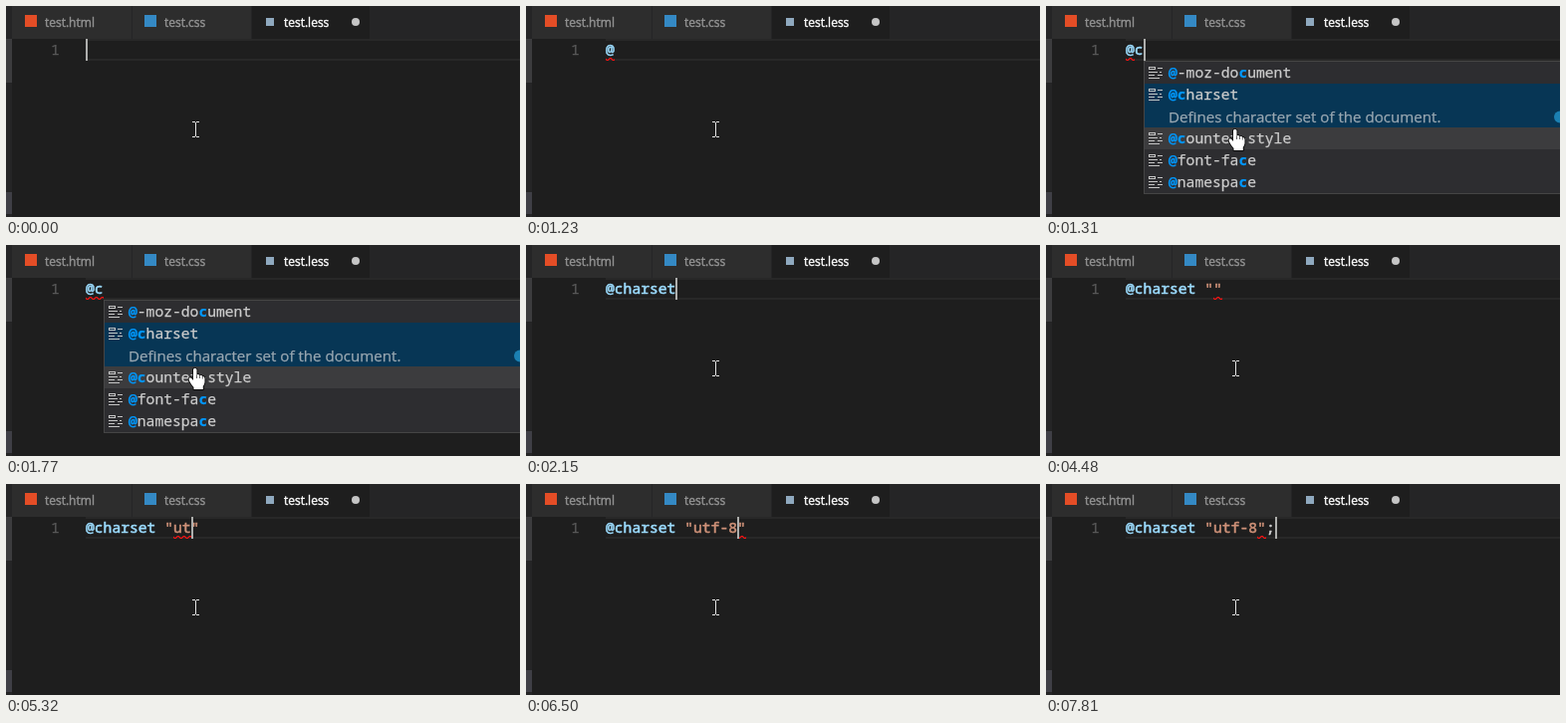
Recreate the animation shown at these times as an HTML page with a canvas. Size 516 by 212 pixels, loop 8 s.

```html
<!DOCTYPE html>
<html lang="en">
<head>
<meta charset="utf-8">
<title>Editor autocomplete</title>
<style>
html, body { margin: 0; width: 516px; height: 212px; overflow: hidden; background: #1e1e1e; }
canvas { display: block; }
</style>
</head>
<body>
<canvas id="stage" width="516" height="212"></canvas>
<script>
const ctx = document.getElementById('stage').getContext('2d');
const LOOP = 8000, CHAR = 8.8, LEFT = 80;
const MONO = '14.667px "Noto Sans Mono", monospace';
const SANS = '"Open Sans", sans-serif';
const OFF = -1;

// start time, typed text, caret column, squiggle start and end columns
const STEPS = [
  [0, '', 0],
  [370, '', OFF],
  [770, '@', 1],
  [1000, '@', 1, 0, 1],
  [1230, '@', OFF, 0, 1],
  [1310, '@c', 2, 0, 1],
  [1460, '@c', 2, 0, 2],
  [1770, '@c', OFF, 0, 2],
  [2150, '@charset', 8],
  [2380, '@charset', 8, 0, 8],
  [2700, '@charset', OFF, 0, 8],
  [3160, '@charset', 8, 0, 8],
  [3240, '@charset ', 9, 0, 8],
  [3620, '@charset ', 9, 7, 8],
  [3690, '@charset ', OFF, 7, 8],
  [4020, '@charset ""', 10, 7, 8],
  [4400, '@charset ""', 10, 10, 11],
  [4480, '@charset ""', OFF, 10, 11],
  [5010, '@charset ""', 10, 10, 11],
  [5090, '@charset "u"', 11, 11, 12],
  [5320, '@charset "ut"', 12, 10, 12],
  [5490, '@charset "ut"', 12, 12, 13],
  [5720, '@charset "utf"', 13, 13, 14],
  [6180, '@charset "utf-"', 14, 14, 15],
  [6500, '@charset "utf-8"', 15, 15, 16],
  [6960, '@charset "utf-8"', OFF, 15, 16],
  [7030, '@charset "utf-8"', 16, 15, 16],
  [7510, '@charset "utf-8"', OFF, 15, 16],
  [7810, '@charset "utf-8";', 17, 15, 16]
];
const POPUP_OPEN = 1310, POPUP_CLOSE = 2150;

const columnX = col => Math.round(LEFT + col * CHAR);

function rect(color, x, y, w, h) {
  ctx.fillStyle = color;
  ctx.fillRect(x, y, w, h);
}

// A thin outline thickens the glyphs a little.
function text(str, x, y, font, color, outline = 0.25) {
  ctx.font = font;
  ctx.fillStyle = ctx.strokeStyle = color;
  ctx.lineWidth = outline;
  ctx.fillText(str, x, y);
  ctx.strokeText(str, x, y);
}

function disc(color, x, y, r) {
  ctx.fillStyle = color;
  ctx.beginPath();
  ctx.arc(x, y, r, 0, Math.PI * 2);
  ctx.fill();
}

function drawFrame() {
  rect('#1e1e1e', 0, 0, 516, 212);
  rect('#252526', 0, 0, 516, 33);
  rect('#252526', 0, 33, 6, 179);
  rect('#3c3c3e', 0, 33, 6, 44);
  rect('#3f3f46', 0, 187, 6, 22);
  rect('#2d2d2d', 6, 0, 120, 33);
  rect('#2d2d2d', 127, 0, 119, 33);
  rect('#1e1e1e', 247, 0, 118, 33);

  rect('#e44d26', 19, 9, 12, 12);
  rect('#3489c4', 139, 9, 12, 12);
  rect('#8fa9bf', 261, 12, 8, 8);
  text('test.html', 39, 21, '12px ' + SANS, '#949494', 0.4);
  text('test.css', 159, 21, '12px ' + SANS, '#949494', 0.4);
  text('test.less', 279, 21, '12px ' + SANS, '#ffffff', 0.4);
  disc('#c5c5c5', 351, 16, 4);

  rect('#282828', LEFT, 33, 436, 2);
  rect('#282828', LEFT, 53, 436, 2);
  text('1', 45, 49, MONO, '#5a5a5a');
}

function drawSquiggle(from, to) {
  const x = columnX(from), end = columnX(to);
  ctx.save();
  ctx.beginPath();
  ctx.rect(x, 52, end - x, 3);
  ctx.clip();
  ctx.beginPath();
  ctx.moveTo(x - 1.2, 52);
  for (let p = x; p < end; p += 6) {
    ctx.lineTo(p + 1.75, 55);
    ctx.lineTo(p + 4.8, 52);
  }
  ctx.lineTo(end + 2, 55);
  ctx.strokeStyle = '#ff1212';
  ctx.lineWidth = 1.1;
  ctx.stroke();
  ctx.restore();
}

function drawCode(code) {
  [...code].forEach((ch, i) => {
    const color = ch === ';' ? '#d4d4d4' : i >= 9 ? '#ce9178' : '#9cdcfe';
    text(ch, LEFT + i * CHAR, 49, MONO, color, 0.55);
  });
}

function drawKeywordIcon(x, y) {
  const bar = (dx, dy, w) => rect('#c5c5c5', x + dx, y + dy, w, 1);
  bar(1, 2, 7);
  bar(1, 3, 1);
  bar(7, 3, 1);
  bar(1, 4, 7);
  bar(10, 3, 5);
  bar(1, 7, 9);
  bar(12, 7, 2);
  bar(1, 10, 6);
  bar(10, 10, 5);
  bar(1, 13, 11);
}

// Letters of the query are highlighted in order as they occur in the label.
function drawSuggestion(label, top, query) {
  let matched = 0;
  drawKeywordIcon(102, top + 3);
  [...label].forEach((ch, i) => {
    const hit = ch === query[matched];
    if (hit) matched++;
    text(ch, 123 + i * CHAR, top + 16, (hit ? 'bold ' : '') + MONO, hit ? '#0097fb' : '#cccccc');
  });
}

function drawPopup(query) {
  rect('#454545', 98, 55, 418, 134);
  rect('#2d2d30', 99, 56, 417, 132);
  rect('#073655', 99, 78, 417, 44);
  rect('#3c3c3e', 99, 122, 417, 22);
  drawSuggestion('@-moz-document', 56, query);
  drawSuggestion('@charset', 78, query);
  drawSuggestion('@counter-style', 122, query);
  drawSuggestion('@font-face', 144, query);
  drawSuggestion('@namespace', 166, query);
  text('Defines character set of the document.', 123, 117, '15.1px ' + SANS, '#9aa8b2');
  disc('#1b80b2', 516, 111.5, 6);
}

function drawBeam() {
  const c = '#e4e4e4';
  rect(c, 190, 117, 1, 14);
  for (const y of [116, 131]) {
    rect(c, 187, y, 3, 1);
    rect(c, 191, y, 3, 1);
  }
}

function drawHand() {
  const hand = new Path2D(
    'M188 125 Q189.5 122.5 191.5 125 V130.5 Q193 129.5 194.5 131 ' +
    'Q196 130.3 197.3 132 Q199.3 131.7 199.5 134 V138 Q199.3 140 197.8 142 V145 ' +
    'H188.5 V143 Q186 140.5 184 136.5 Q182.8 133.4 185 133.3 Q186.7 133.8 188 136 Z');
  ctx.strokeStyle = '#000000';
  ctx.lineWidth = 1.6;
  ctx.stroke(hand);
  ctx.fillStyle = '#ffffff';
  ctx.fill(hand);
  ctx.lineWidth = 0.6;
  ctx.stroke(new Path2D('M191.5 130.5 V134 M194.5 131 V134 M197.3 132 V134.5'));
}

function draw(t) {
  const [, code, caret, from, to] = STEPS.findLast(step => step[0] <= t);
  const popup = t >= POPUP_OPEN && t < POPUP_CLOSE;
  drawFrame();
  drawCode(code);
  if (to) drawSquiggle(from, to);
  if (caret !== OFF) rect('#aeafad', columnX(caret), 33, 2, 22);
  if (popup) {
    drawPopup(code);
    drawHand();
  } else {
    drawBeam();
  }
}

const start = performance.now();
function tick() {
  draw((performance.now() - start) % LOOP);
  requestAnimationFrame(tick);
}
tick();
</script>
</body>
</html>
```
